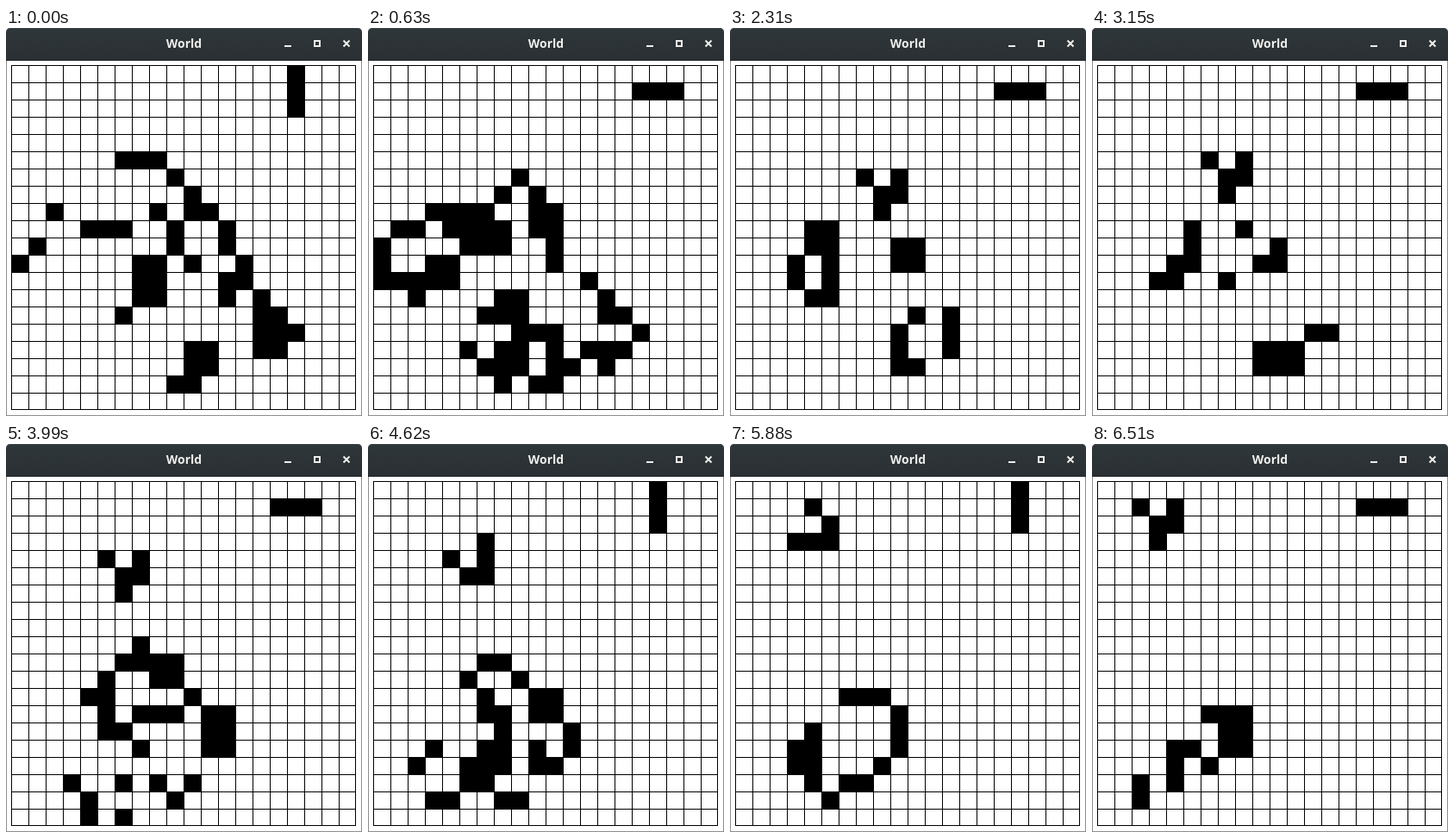
Animation of 413x450 px, one loop 6720 ms. Source, as an HTML page with a canvas:

```html
<!DOCTYPE html>
<html lang="en">
<head>
<meta charset="utf-8">
<title>World</title>
<style>
  html, body { margin: 0; width: 100%; height: 100%; overflow: hidden; background: #fff; }
  .window { position: absolute; left: 0; top: 0; width: 413px; height: 450px; background: #fff; }
  .frame { position: absolute; inset: 37px 0 0; border: solid #8b8e8f; border-width: 0 1px 1px; }
  .bar {
    position: absolute; inset: 0 0 auto; height: 38px; box-sizing: border-box;
    border-bottom: 1px solid #1c2022; border-radius: 5px 5px 0 0;
    background: linear-gradient(#2f3639, #2a3033);
    box-shadow: inset 0 1px #3d4447;
    color: #eeeeec; font: bold 14px/36px "Noto Sans", "Open Sans", sans-serif; text-align: center;
  }
  .bar svg { position: absolute; left: 0; top: 0; }
  canvas { position: absolute; left: 6px; top: 43px; }
</style>
</head>
<body>
<div class="window">
  <div class="frame"></div>
  <div class="bar">World
    <svg width="413" height="37" fill="none" stroke="#eeeeec" stroke-width="2">
      <path d="M323 21h8"/>
      <path d="M358 15h6v6h-6z"/>
      <path d="M391.5 14.5l7 7m0-7l-7 7"/>
    </svg>
  </div>
  <canvas width="400" height="400"></canvas>
</div>
<script>
const SIZE = 20, CELL = 20, STEP = 210, COUNT = 32;

// Live columns by row of the first generation.
const SEED = {
  1: [2, 4, 15, 16, 17],
  2: [3, 4],
  3: [3],
  13: [6, 7, 8],
  14: [7, 8],
  15: [4, 5, 7, 8],
  16: [4, 6],
  17: [2, 4],
  18: [2],
};

const makeWorld = rule => Array.from({ length: SIZE }, (_, row) =>
  Array.from({ length: SIZE }, (_, col) => rule(row, col)));

function neighbours(world, row, col) {
  let sum = 0;
  for (let dy = -1; dy <= 1; dy++)
    for (let dx = -1; dx <= 1; dx++)
      if ((dx || dy) && world[row + dy]?.[col + dx]) sum++;
  return sum;
}

const evolve = world => makeWorld((row, col) => {
  const n = neighbours(world, row, col);
  return n === 3 || (n === 2 && world[row][col]);
});

const history = [makeWorld((row, col) => !!SEED[row]?.includes(col))];
while (history.length < COUNT) history.push(evolve(history.at(-1)));
history.reverse(); // the world is shown running backwards in time

const ctx = document.querySelector("canvas").getContext("2d");

function draw(world) {
  const extent = SIZE * CELL;
  ctx.fillStyle = "#fff";
  ctx.fillRect(0, 0, extent, extent);
  ctx.fillStyle = "#000";
  for (let i = 0; i <= SIZE; i++) {
    const at = Math.min(i * CELL, extent - 1);
    ctx.fillRect(at, 0, 1, extent);
    ctx.fillRect(0, at, extent, 1);
  }
  world.forEach((cells, row) => cells.forEach((alive, col) => {
    if (alive) ctx.fillRect(col * CELL, row * CELL, CELL, CELL);
  }));
}

const start = performance.now();
let shown = -1;

function tick() {
  const index = Math.floor((performance.now() - start) / STEP) % COUNT;
  if (index !== shown) draw(history[shown = index]);
  requestAnimationFrame(tick);
}
tick();
</script>
</body>
</html>
```
